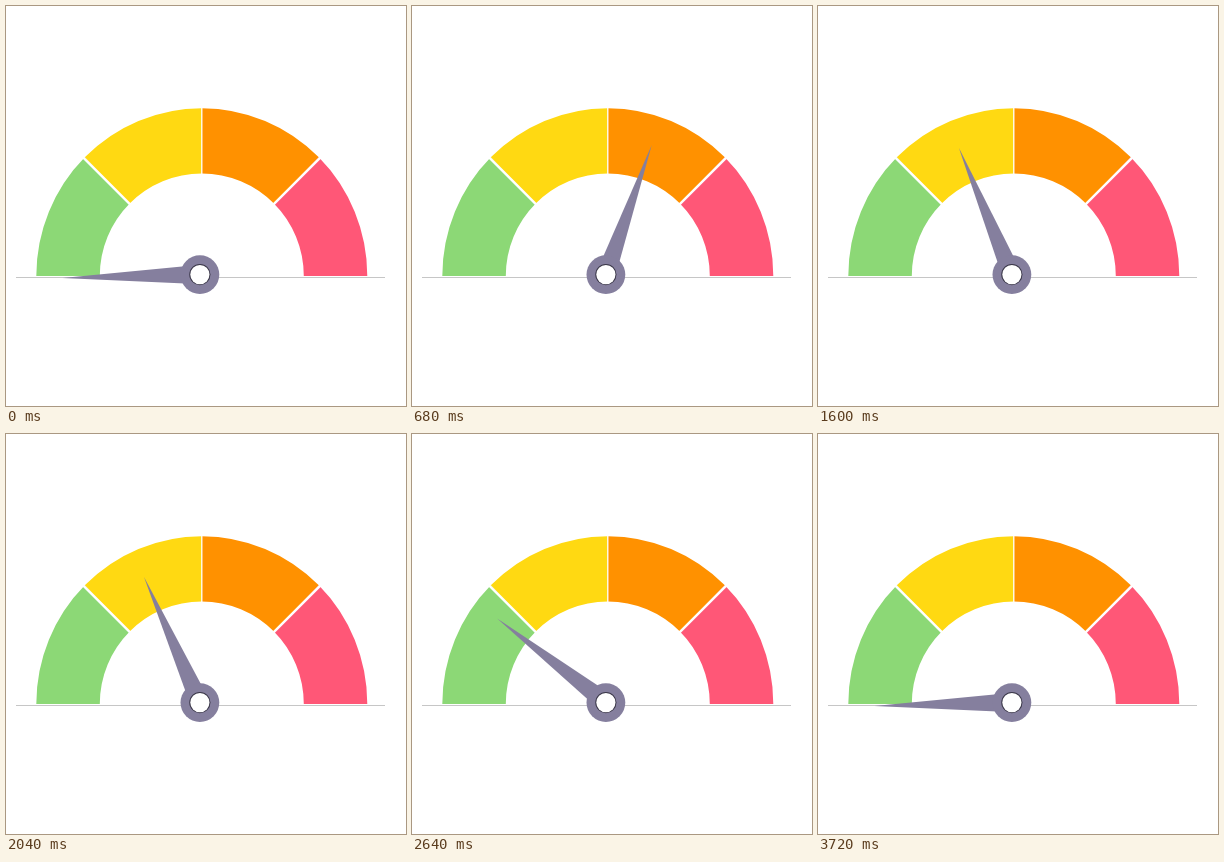
An HTML page with a canvas for the animation above (3.84 s loop, 400x400 px).

```html
<!DOCTYPE html>
<html lang="en">
<head>
<meta charset="utf-8">
<title>Gauge</title>
<style>
  html, body { margin: 0; width: 100%; height: 100%; overflow: hidden; background: #fff; }
  canvas { display: block; width: 100vw; height: 100vh; object-fit: contain; }
</style>
</head>
<body>
<canvas id="stage" width="400" height="400"></canvas>
<script>
const ctx = document.getElementById('stage').getContext('2d');
const LOOP = 3840, STEP = 40;
const DIAL = { x: 195.8, y: 270 };
const HUB = { x: 193.9, y: 268.6 };
const COLORS = ['#8cd876', '#ffd912', '#ff9100', '#ff5777'];
const NEEDLE = '#857f9e';

// Needle angles in degrees, clockwise from pointing left.
const HOME = -1.4, PEAK = 141, REST = 67.3;

const mix = (a, b, k) => a + (b - a) * k;
const smooth = s => s * s * (3 - 2 * s);
const easeOut = u => 1 - (1 - u) ** 3;
// Long, slow departure followed by a sharp drop.
const plunge = u => smooth(1 - Math.cbrt(1 - u));

const moves = [
  { start: 0, end: 500, from: HOME, to: PEAK, ease: smooth },
  { start: 500, end: 1560, from: PEAK, to: REST, ease: easeOut },
  { start: 1820, end: 2800, from: REST, to: HOME, ease: plunge }
];

function needleAngle(t) {
  const move = moves.filter(m => t >= m.start).pop();
  const u = Math.min(1, (t - move.start) / (move.end - move.start));
  return mix(move.from, move.to, move.ease(u));
}

function line(x1, y1, x2, y2, width, color) {
  ctx.beginPath();
  ctx.moveTo(x1, y1);
  ctx.lineTo(x2, y2);
  ctx.lineWidth = width;
  ctx.strokeStyle = color;
  ctx.stroke();
}

function disc(x, y, r, color) {
  ctx.beginPath();
  ctx.arc(x, y, r, 0, Math.PI * 2);
  ctx.fillStyle = color;
  ctx.fill();
}

function drawDial() {
  line(10, 271.5, 379, 271.5, 1, '#c6c6c6');
  COLORS.forEach((color, i) => {
    const a = Math.PI * (1 + i / 4), b = a + Math.PI / 4;
    ctx.beginPath();
    ctx.ellipse(DIAL.x, DIAL.y, 165.5, 167.8, 0, a, b);
    ctx.ellipse(DIAL.x, DIAL.y, 102, 102.5, 0, b, a, true);
    ctx.fillStyle = color;
    ctx.fill();
  });
  for (let i = 1; i < 4; i++) {
    const a = Math.PI * (1 + i / 4), c = Math.cos(a), s = Math.sin(a);
    line(DIAL.x + 100 * c, DIAL.y + 100 * s, DIAL.x + 170 * c, DIAL.y + 170 * s,
      i === 2 ? 1.3 : 2.4, '#fff');
  }
}

function drawNeedle(degrees) {
  ctx.save();
  ctx.translate(HUB.x, HUB.y);
  ctx.rotate(degrees * Math.PI / 180);
  ctx.beginPath();
  ctx.moveTo(-137.5, 0);
  ctx.lineTo(-15, -8.6);
  ctx.lineTo(-15, 8.6);
  ctx.fillStyle = NEEDLE;
  ctx.fill();
  ctx.restore();
  disc(HUB.x, HUB.y, 19.4, NEEDLE);
  disc(HUB.x, HUB.y, 10.6, '#3a3748');
  disc(HUB.x, HUB.y, 9.6, '#fff');
}

function draw(now) {
  const t = Math.floor((now % LOOP) / STEP) * STEP;
  ctx.fillStyle = '#fff';
  ctx.fillRect(0, 0, 400, 400);
  drawDial();
  drawNeedle(needleAngle(t));
}

let origin;
function tick(now) {
  origin ??= now;
  draw(now - origin);
  requestAnimationFrame(tick);
}
draw(0);
requestAnimationFrame(tick);
</script>
</body>
</html>
```
